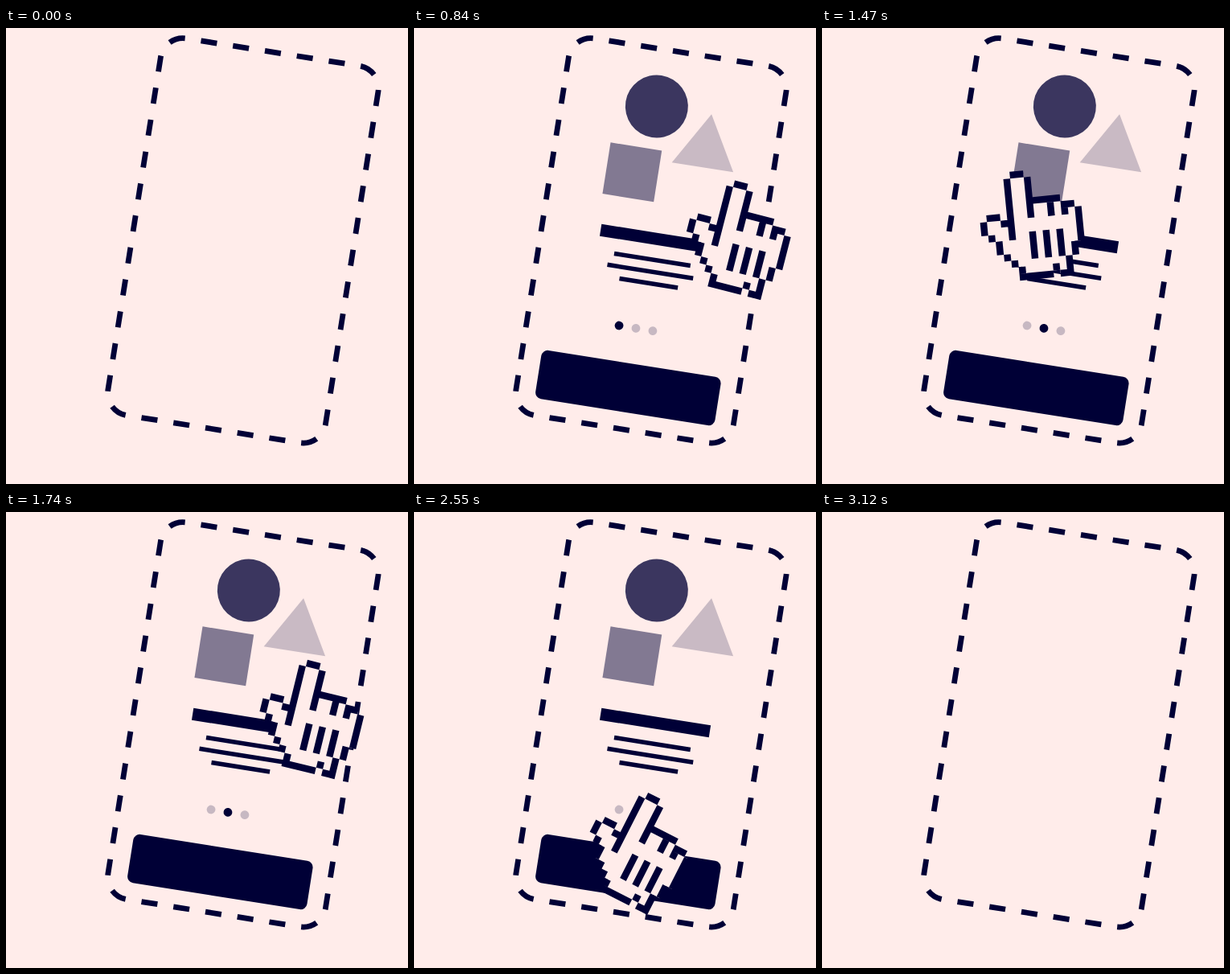
These frames come from a looping animation (500x567 px, 3360 ms). An HTML page:

```html
<!DOCTYPE html>
<html lang="en">
<head>
<meta charset="utf-8">
<title>Swipe and tap</title>
<style>
  html, body { margin: 0; width: 100%; height: 100%; overflow: hidden; background: #ffecea; }
  svg { display: block; width: 100vw; height: 100vh; }
</style>
</head>
<body>
<svg viewBox="0 0 500 567" fill="#000036">
  <defs>
    <g id="card">
      <circle cx="-19.7" cy="-166.3" r="39" opacity=".77"/>
      <rect x="-69.3" y="-113" width="64.5" height="64.5" opacity=".49"/>
      <path d="M49.2-167.3 87.2-100.4H9.8Z" opacity=".21"/>
      <path d="M-64.5-11h137.5v15h-137.5z"/>
      <path d="M-43.3 22.7h96M-49.5 37.7h108M-32 52.3h73.5" stroke="#000036" stroke-width="5.5"/>
    </g>
  </defs>
  <g transform="translate(295.3 264.8) rotate(9)">
    <rect x="-137.4" y="-237.6" width="273.9" height="474.5" rx="28" fill="none" stroke="#000036"
      stroke-width="6.8" pathLength="1440" stroke-dasharray="20" stroke-dashoffset="-18.2"/>
    <g id="screen">
      <use id="leaving" href="#card"/>
      <use id="coming" href="#card"/>
      <g id="dots">
        <circle cx="-23.3" cy="110.2" r="5.4"/>
        <circle cx="-2.1" cy="110.2" r="5.4"/>
        <circle cx="19.1" cy="110.2" r="5.4"/>
      </g>
      <g id="button"><rect x="-113" y="-30.5" width="226" height="61" rx="8"/></g>
    </g>
  </g>
  <!-- One unit is one block of the pixel hand -->
  <g id="hand">
    <path fill="#ffecea" d="M.5 0H1V-.5H3V0H3.5V3.5H8V4.5H10V5H10.5V10H9.5V12H8.5V14.5H7V14H6V14.5H1.5V13H1
      L0 12-1 11H-1.5V9H-2L-3 8H-3.5V6H-3V5.5H-1V6L-.5 6.5H.5Z"/>
    <path fill="none" stroke="#000036" d="M1-.5h2M.5 0v9M3.5 0v6M4 3.5h4M6.5 4v2M8 4.5h2M8.5 5v1
      M10.5 5v5M9.5 10v2M8.5 12v3M7 14.5h1M6 13.5h1M1 14.5h5M1.5 13v1M0 12.5h1M-1 11.5h1M-1.5 9v2
      M-3 8.5h1M-3.5 6v2M-3 5.5h2M-1 6.5h1M3.5 8v4M5.5 8v4M7.5 8v4"/>
  </g>
</svg>
<script>
const LOOP = 3360, SLIDE = 44, BLOCK = 8.5;
const el = id => document.getElementById(id);
const [view, leaving, coming, button, hand] =
  ['screen', 'leaving', 'coming', 'button', 'hand'].map(el);
const dots = [...el('dots').children];

const ramp = (t, from, to) => Math.min(1, Math.max(0, (t - from) / (to - from)));
const quadOut = u => 1 - (1 - u) ** 2;
const cubicOut = u => 1 - (1 - u) ** 3;
const smooth = u => u * u * (3 - 2 * u);

// Winds up a little, then overshoots a little
function swing(u) {
  const half = w => w * w * (2.2 * w - 1.2) / 2;
  return u < 0.5 ? half(2 * u) : 1 - half(2 - 2 * u);
}

// Hand poses: x, y, angle
const outside = [643, 94, 90];
const right = [385.5, 195.5, 14];
const left = [219, 188, -6.5];
const middle = [361, 190, 13.3];
const tap = [262, 409, 24];

const moves = [
  { from: outside, to: right, start: 30, end: 570, ease: quadOut },
  { from: right, to: left, start: 780, end: 1290, ease: swing },
  { from: left, to: middle, start: 1300, end: 1830, ease: swing },
  { from: middle, to: left, start: 1860, end: 2226, ease: swing },
  { from: left, to: tap, start: 2330, end: 2660, ease: smooth, bend: [40, 0, 15] }
];

function handPose(t) {
  const { from, to, start, end, ease, bend = [0, 0, 0] } =
    moves.findLast(m => t >= m.start) || moves[0];
  const p = ease(ramp(t, start, end));
  return from.map((a, k) => a + (to[k] - a) * p + bend[k] * Math.sin(Math.PI * p));
}

function place(node, x, y, opacity) {
  node.setAttribute('transform', `translate(${x} ${y})`);
  node.setAttribute('opacity', opacity);
}

function draw(t) {
  const shown = cubicOut(ramp(t, 15, 310));
  const gone = 1 - ramp(t, 2890, 3110);
  const [first, second] = [990, 1885].map(s => cubicOut(ramp(t, s, s + 350)));
  const p = second || (t < 1885 ? first : 0);

  place(view, 0, 12 * (1 - shown), shown * gone);
  place(leaving, -SLIDE * p, 0, 1 - p);
  place(coming, SLIDE * (1 - p), 0, p);

  [1 - first, first - second, second].forEach((on, i) =>
    dots[i].setAttribute('opacity', 0.22 + 0.78 * on));

  const press = Math.sin(Math.PI * ramp(t, 2680, 2900));
  button.setAttribute('transform', `translate(0 185) scale(${1 + 0.06 * press})`);

  const [x, y, angle] = handPose(t);
  hand.setAttribute('transform', `translate(${x} ${y}) rotate(${angle}) scale(${BLOCK})`);
  hand.setAttribute('opacity', gone);
}

const begin = performance.now();
function tick() {
  draw((performance.now() - begin) % LOOP);
  requestAnimationFrame(tick);
}
tick();
</script>
</body>
</html>
```
